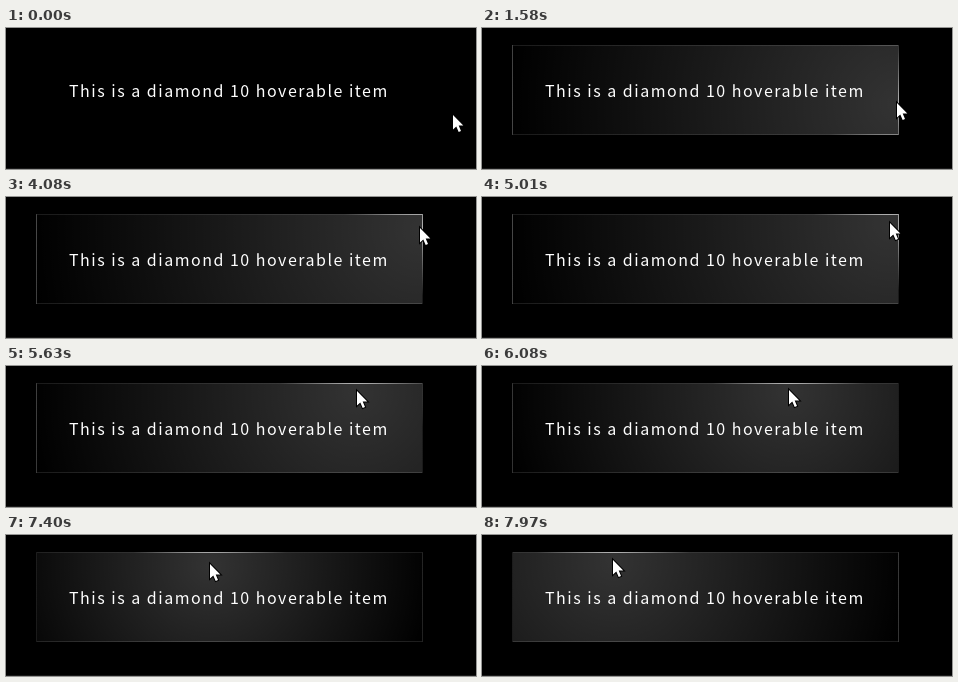
Write an HTML page that moves like this. It is 470 px wide and 141 px high and loops after 8000 ms.

```html
<!DOCTYPE html>
<html lang="en">
<head>
<meta charset="utf-8">
<title>Hover glow</title>
<style>
  html, body { margin: 0; width: 100%; height: 100%; overflow: hidden; background: #000; }
  #stage {
    position: relative; width: 470px; height: 141px; overflow: hidden;
    box-sizing: border-box; border-bottom: 1px solid #1a1a1a;
  }
  #item {
    position: absolute; left: 30px; top: 17px; width: 387px; height: 90px;
    box-sizing: border-box; padding: 32px; border: 1px solid transparent;
    color: #fff; white-space: nowrap; letter-spacing: 1.5px;
    font: 16px/24px "Noto Sans CJK JP", "Noto Sans CJK SC", "Noto Sans CJK", sans-serif;
  }
  #cursor { position: absolute; left: 0; top: 0; overflow: visible; }
  #cursor path { fill: #fff; stroke: #000; stroke-width: 2; paint-order: stroke; }
</style>
</head>
<body>
<div id="stage">
  <div id="item">This is a diamond 10 hoverable item</div>
  <svg id="cursor" width="12" height="19">
    <path d="M0 0V14.5L3.3 11.5L5.7 17L8 16L5.7 10.6H10.3Z"/>
  </svg>
</div>
<script>
const LOOP = 8000;
const BOX = { left: 30, top: 17, right: 417, bottom: 107 };

// Pointer path: time in ms, x, y
const PATH = [
  [0, 447, 87], [500, 447, 87], [1280, 425, 79], [1340, 416, 77],
  [1880, 414, 73], [2950, 414, 73], [2980, 414, 72], [3770, 414, 61],
  [4080, 414, 31], [4180, 414, 31], [4540, 412, 28], [4740, 412, 28],
  [5060, 407, 26], [5220, 405, 25], [5630, 351, 25], [5930, 318, 24],
  [6030, 313, 24], [6470, 261, 24], [6830, 236, 25], [7400, 204, 29],
  [7660, 186, 28], [7710, 182, 28], [7970, 131, 25], [LOOP, 131, 25]
];

const item = document.getElementById("item");
const cursor = document.getElementById("cursor");

function pointerAt(time) {
  const next = PATH.findIndex(point => point[0] > time);
  const [t0, x0, y0] = PATH[next - 1];
  const [t1, x1, y1] = PATH[next];
  const k = (time - t0) / (t1 - t0);
  return [Math.round(x0 + (x1 - x0) * k), Math.round(y0 + (y1 - y0) * k)];
}

function glow(shape, x, y, inner, outer) {
  return `radial-gradient(${shape} at ${x}px ${y}px, ` +
    `rgba(255,255,255,${inner}), rgba(255,255,255,${outer}))`;
}

function draw(time) {
  const [x, y] = pointerAt(time);
  const inside = x >= BOX.left && x < BOX.right && y >= BOX.top && y < BOX.bottom;
  const localX = x - BOX.left, localY = y - BOX.top;
  cursor.style.transform = `translate(${x}px, ${y}px)`;
  item.style.background = inside ? glow("circle", localX, localY, 0.2, 0) : "none";
  item.style.borderImage = inside
    ? glow("20% 75%", localX, localY, 0.7, 0.1) + " 1 / 1px / 0px stretch"
    : "none";
}

const start = performance.now();
function tick() {
  draw((performance.now() - start) % LOOP);
  requestAnimationFrame(tick);
}
tick();
</script>
</body>
</html>
```
